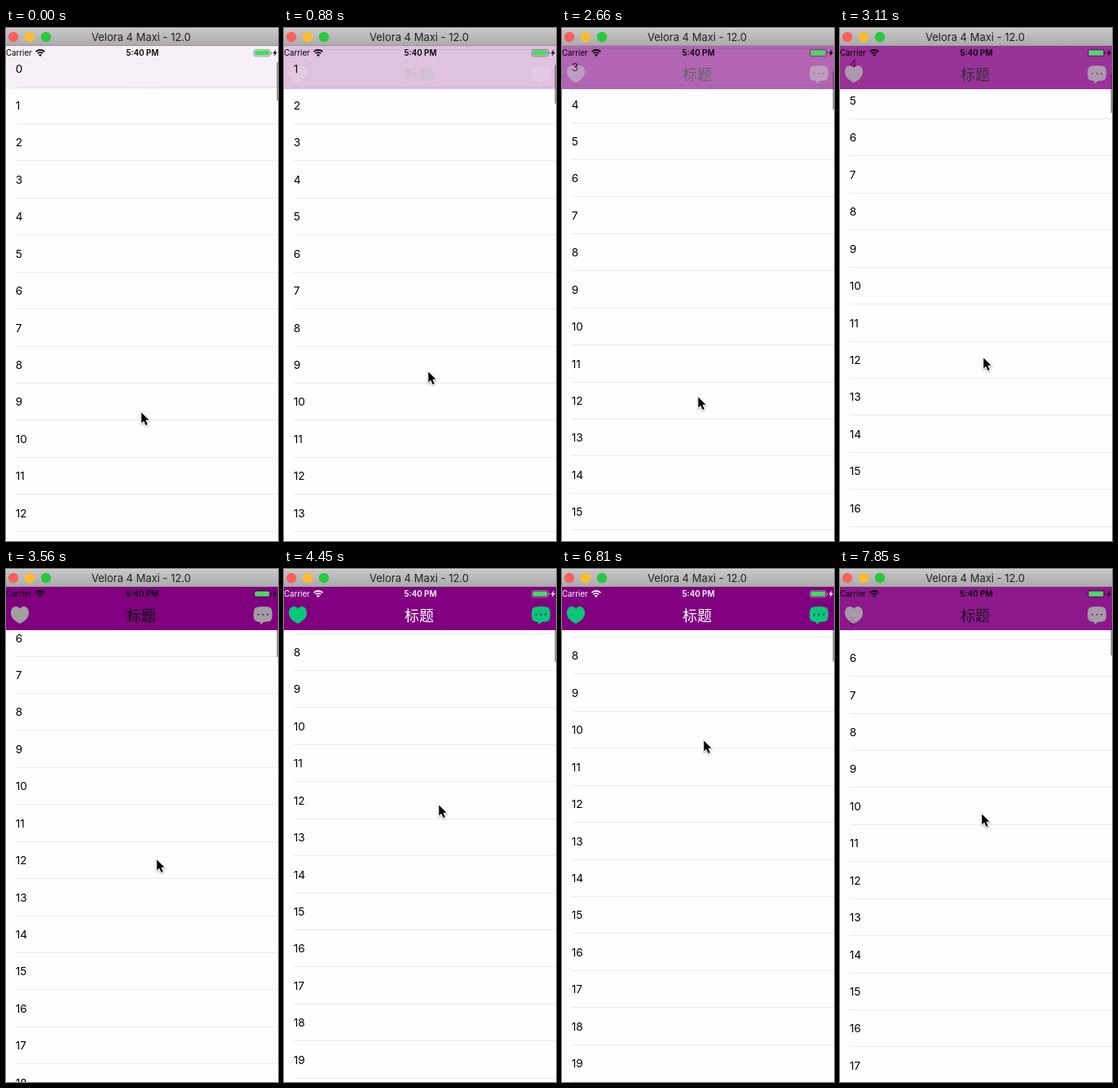
These frames come from a looping animation (334x629 px, 7.99 s). An HTML page with a canvas:

```html
<!DOCTYPE html>
<html lang="zh-CN">
<head>
<meta charset="utf-8">
<title>List with fading bar</title>
<style>
html, body { margin: 0; width: 100%; height: 100%; overflow: hidden; background: #fff; }
canvas { display: block; }
</style>
</head>
<body>
<canvas id="stage" width="334" height="629"></canvas>
<script>
const ctx = document.getElementById('stage').getContext('2d');
const W = 334, H = 629, LOOP = 7990, STEP = 148.2;
const ROW = 45.43, BAR_TOP = 22, BAR_BOTTOM = 75;
const SANS = 'Inter, "Liberation Sans", sans-serif';
const CJK = '"Noto Sans CJK SC", "Noto Sans CJK", sans-serif';

// The bar is painted on its own layer so that it fades as one piece
const layer = document.createElement('canvas');
layer.width = W;
layer.height = BAR_BOTTOM;
const bar = layer.getContext('2d');

// step, scroll offset, pointer x, pointer y
const KEYS = [
  [0, 0, 166, 471], [6, 45.4, 177, 421], [9, 85, 181, 381], [12, 110, 184, 357],
  [13, 110, 184, 357], [16, 112, 172, 478], [18, 137.7, 167, 452],
  [24, 237.5, 185, 356], [30, 311, 190, 289], [31, 311, 190, 289],
  [34, 335, 190, 265], [38, 337, 184, 225], [39, 337, 184, 225],
  [42, 335, 175, 182], [46, 306.5, 174, 210], [48, 236, 174, 278], [53, 213, 174, 300]
];

const HEART = new Path2D('M17 67C10 63.5 6 59.5 6 53.5C6 49 8.7 46 12.1 46C14.3 46 16 47.1 17 48.8C18 47.1 19.7 46 21.9 46C25.3 46 28 49 28 53.5C28 59.5 24 63.5 17 67Z');
const BUBBLE = new Path2D('M309 46.4Q315.5 45.6 322 46.4Q326 47 326.6 51Q327.4 55.5 326.6 60Q326 64 322 64.6L316.5 65L312.6 68.3L312 65L309 64.6Q305 64 304.4 60Q303.6 55.5 304.4 51Q305 47 309 46.4Z');
for (const x of [309.8, 315.5, 321.2]) {
  BUBBLE.moveTo(x + 1.1, 55.8);
  BUBBLE.arc(x, 55.8, 1.1, 0, 7);
}
const ARROW = new Path2D('M0 0V13L2.9 10.2L5.3 15.4L7.5 14.5L5.1 9.3H9.2Z');
const BOLT = new Path2D('M331.6 26L327.6 31.3H330L328.8 35L333 29.7H330.5Z');

function poseAt(step) {
  const i = Math.max(1, KEYS.findIndex(k => k[0] >= step));
  const a = KEYS[i - 1], b = KEYS[i];
  const p = (step - a[0]) / (b[0] - a[0]);
  return a.slice(1).map((v, j) => v + (b[j + 1] - v) * p);
}

function text(str, x, y, font, color, align = 'left', target = ctx) {
  target.font = font;
  target.fillStyle = color;
  target.textAlign = align;
  target.fillText(str, x, y);
}

function rect(x, y, w, h, color) {
  ctx.fillStyle = color;
  ctx.fillRect(x, y, w, h);
}

function disc(x, y, r, color) {
  ctx.fillStyle = color;
  ctx.beginPath();
  ctx.arc(x, y, r, 0, 7);
  ctx.fill();
}

function drawList(scroll) {
  for (let i = 0; i < 24; i++) {
    const y = 50 - scroll + i * ROW;
    if (y < 0 || y > H + ROW) continue;
    text(String(i), 11.7, Math.floor(y + 5), '13.7px ' + SANS, '#000');
    rect(12, Math.floor(y + 22), W - 12, 1, '#ebebed');
  }
  rect(332.5, 42 + scroll * 0.08, 1.5, 47, '#8c8c8c');
}

function drawBar(alpha, solid) {
  bar.globalAlpha = 1;
  bar.fillStyle = '#800080';
  bar.fillRect(0, BAR_TOP, W, BAR_BOTTOM - BAR_TOP);
  text('标题', 166, 63.5, '18px ' + CJK, solid ? '#fff' : '#000', 'center', bar);
  bar.globalAlpha = alpha;
  bar.fillStyle = solid ? '#08c878' : '#a0a0a0';
  bar.fill(HEART);
  bar.fill(BUBBLE, 'evenodd');

  ctx.globalAlpha = alpha;
  ctx.drawImage(layer, 0, 0);
  ctx.globalAlpha = 1;
}

function drawStatus(color) {
  text('Carrier', 0, 34.2, '9.7px ' + SANS, color);
  text('5:40 PM', 167.5, 34.2, '600 9.8px ' + SANS, color, 'center');

  ctx.strokeStyle = color;
  ctx.lineWidth = 1.7;
  for (const r of [4.6, 7.6]) {
    ctx.beginPath();
    ctx.arc(42, 34.5, r, -Math.PI * 0.75, -Math.PI * 0.25);
    ctx.stroke();
  }
  ctx.fillStyle = color;
  ctx.beginPath();
  ctx.moveTo(42, 35);
  ctx.arc(42, 34.8, 2.7, -Math.PI * 0.75, -Math.PI * 0.25);
  ctx.fill();

  ctx.lineWidth = 0.8;
  ctx.globalAlpha = 0.45;
  ctx.beginPath();
  ctx.roundRect(304.4, 26.4, 20, 8.4, 2.2);
  ctx.stroke();
  rect(325.3, 29, 1, 3.2, color);
  ctx.globalAlpha = 1;
  ctx.fillStyle = '#4cd964';
  ctx.beginPath();
  ctx.roundRect(305.6, 27.6, 17.6, 6, 1.2);
  ctx.fill();
  ctx.fillStyle = color;
  ctx.fill(BOLT);
}

function drawWindowTop() {
  const g = ctx.createLinearGradient(0, 0, 0, BAR_TOP);
  g.addColorStop(0, '#c8c8c8');
  g.addColorStop(1, '#aaaaaa');
  rect(0, 0, W, BAR_TOP, g);
  rect(0, 0, W, 1, '#d6d6d6');
  rect(0, BAR_TOP - 1, W, 1, '#979797');
  ['#fc605c', '#fdbc2f', '#28c840'].forEach((c, i) => disc(9 + i * 20, 11, 6.2, c));
  text('Velora 4 Maxi - 12.0', 166, 16, '13px ' + SANS, '#222', 'center');
}

function drawPointer(x, y) {
  ctx.save();
  ctx.translate(x + 0.3, y + 0.5);
  ctx.shadowColor = 'rgba(0,0,0,.35)';
  ctx.shadowBlur = 2;
  ctx.shadowOffsetY = 1;
  ctx.strokeStyle = '#fff';
  ctx.lineWidth = 2;
  ctx.stroke(ARROW);
  ctx.shadowColor = 'transparent';
  ctx.fillStyle = '#000';
  ctx.fill(ARROW);
  ctx.restore();
}

function draw(now) {
  const step = Math.min(53, Math.floor((now % LOOP + 12) / STEP));
  const [scroll, x, y] = poseAt(step);
  const alpha = Math.min(1, (scroll + 12) / 250);
  const solid = alpha >= 1;
  rect(0, 0, W, H, '#fefefe');
  drawList(scroll);
  drawBar(alpha, solid);
  drawStatus(solid ? '#fff' : '#000');
  drawWindowTop();
  drawPointer(x, y);
  requestAnimationFrame(draw);
}

requestAnimationFrame(draw);
</script>
</body>
</html>
```
